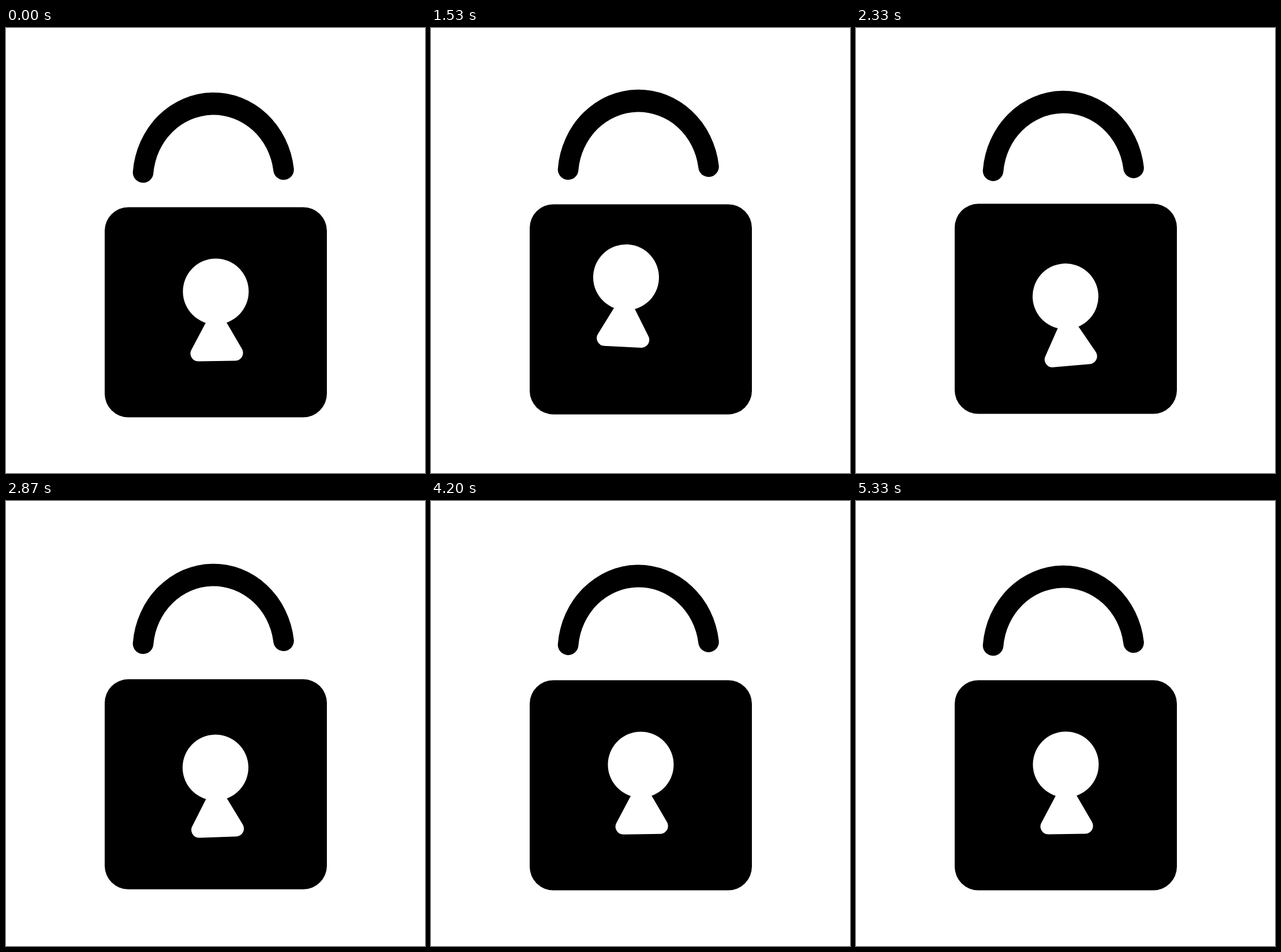
Animation, 726 px wide and 771 px high, one loop 5.73 s. Source, as an HTML page:

```html
<!DOCTYPE html>
<html lang="en">
<head>
<meta charset="utf-8">
<title>Padlock</title>
<style>
  html, body { margin: 0; width: 100%; height: 100%; overflow: hidden; background: #fff; }
  svg { display: block; width: 100%; height: 100%; }
</style>
</head>
<body>
<svg viewBox="0 0 726 771">
  <path id="shackle" d="M219.8 249A140.2 149.5 0 0 1 498.8 244A17.8 17.8 0 0 1 463.2 246.5A104.6 111 0 0 0 255.4 251.5A17.8 17.8 0 0 1 219.8 249Z"/>
  <rect id="block" x="171" y="310.5" width="385" height="364" rx="41"/>
  <g id="keyhole" fill="#fff">
    <circle r="57"/>
    <path d="M-12 44L-41.7 100A13.6 13.6 0 0 0 -30 121L34 120A13.6 13.6 0 0 0 45.2 99.3L13 44Z"/>
  </g>
</svg>
<script>
const LOOP = 5730, BEAT = 600, END = 5320;
const [shackle, block, keyhole] = ['shackle', 'block', 'keyhole'].map(id => document.getElementById(id));

// The keyhole looks right, left and down, then settles
const looks = [
  { time: 200, x: 0, y: 0, angle: 0 },
  { time: 760, x: 35.5, y: -14.7, angle: -5.3 },
  { time: 1480, x: -25.5, y: -24.5, angle: 3.7 },
  { time: 2320, x: -0.5, y: 8.5, angle: -4.1 },
  { time: 2960, x: -0.5, y: 5, angle: -0.8 },
  { time: 4400, x: 0, y: 0, angle: 0 }
];

const smooth = (from, to, time) => {
  const p = Math.min(1, Math.max(0, (time - from) / (to - from)));
  return p * p * (3 - 2 * p);
};
const wave = (time, peak, period) => Math.cos(2 * Math.PI * (time - peak) / period);
const burst = (time, start, end) => smooth(start, start + 150, time) * smooth(end, end - 150, time);

function keyholePose(time) {
  const pose = { ...looks[0] };
  for (let i = 1; i < looks.length; i++) {
    const p = smooth(looks[i - 1].time, looks[i].time, time);
    for (const k of ['x', 'y', 'angle']) pose[k] += (looks[i][k] - looks[i - 1][k]) * p;
  }
  return pose;
}

// The lock rattles in two bursts; in between the shackle sinks gently
function lockPose(time) {
  const rattle = burst(time, 600, 3000) + burst(time, 3600, 4800);
  const sink = 3.3 * (1 - wave(time, 0, END / 5));
  const jerk = -4.2 - 9 * wave(time, 727, 337);
  return {
    shackle: sink + (jerk - sink) * rattle,
    block: -3.5 * (1 - wave(time, 760, 430)) * rattle
  };
}

// 15 poses per beat, shown in 16 slots with the first pose held for two
function poseTime(time) {
  const slot = Math.floor((time % BEAT + 5) / (BEAT / 16));
  const pose = Math.min(14, Math.max(0, slot - 1));
  return Math.min(END, Math.floor(time / BEAT) * BEAT + pose * 40);
}

function draw() {
  const now = performance.now() % LOOP;
  const time = now >= 5330 ? END : poseTime(now);
  const lock = lockPose(time), { x, y, angle } = keyholePose(time);
  shackle.setAttribute('transform', `translate(0 ${lock.shackle})`);
  block.setAttribute('transform', `translate(0 ${lock.block})`);
  keyhole.setAttribute('transform', `translate(${363.5 + x} ${456.5 + y}) rotate(${angle})`);
  requestAnimationFrame(draw);
}
draw();
</script>
</body>
</html>
```
